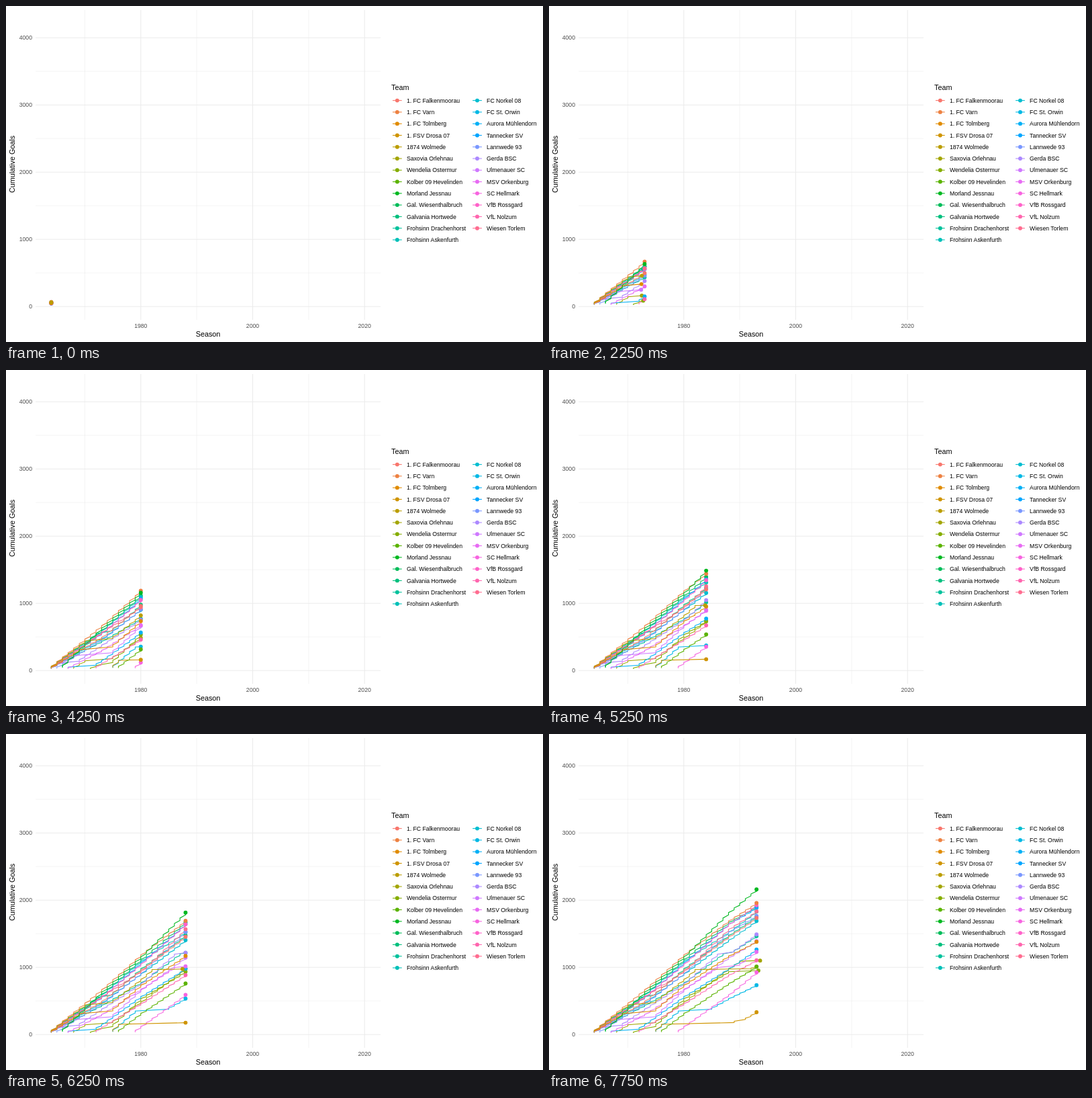
Animation, 800 px wide and 500 px high, one loop 8 s. Source, as an HTML page:

```html
<!DOCTYPE html>
<html lang="de">
<head>
<meta charset="utf-8">
<style>
  html, body { margin: 0; width: 100%; height: 100%; overflow: hidden; background: #fff; }
  svg { display: block; font: 8.7px "Liberation Sans", Arial, sans-serif; }
  .title { font-size: 10.8px; }
  .tick { fill: #4d4d4d; }
  .end { text-anchor: end; }
  .middle { text-anchor: middle; }
  .grid { stroke: #ebebeb; }
  polyline { fill: none; stroke-width: 1.07; }
</style>
</head>
<body>
<svg width="800" height="500" viewBox="0 0 800 500"></svg>
<script>
// Each team: name, totals at the knot years, first season, then pairs of first and last missed season.
const TEAMS = [
  ['1. FC Falkenmoorau', [497, 960, 1455, 1735]],
  ['1. FC Varn', [668, 1187, 1692, 1957]],
  ['1. FC Tolmberg', [310, 735, 1170, 1380], 64, 70, 74],
  ['1. FSV Drosa 07', [152, 152, 332], 75, 77, 88, 90, 90],
  ['1874 Wolmede', [440, 820, 967, 1010], 64, 71, 74, 83, 91],
  ['Saxovia Orlehnau', [145, 485, 980, 1091], 68, 71, 74, 91, 99],
  ['Wendelia Ostermur', [75, 535, 935, 935], 71, 73, 74, 89, 95],
  ['Kolber 09 Hevelinden', [315, 760, 1010], 76],
  ['Morland Jessnau', [632, 1157, 1815, 2160], 66],
  ['Gal. Wiesenthalbruch', [600, 1115, 1670, 1900], 66],
  ['Galvania Hortwede', [550, 980, 1475, 1755], 64, 73, 74],
  ['Frohsinn Drachenhorst', [435, 770, 1200, 1465], 64, 88, 88],
  ['Frohsinn Askenfurth', [590, 1095, 1525, 1830]],
  ['FC Norkel 08', [475, 905, 1405, 1690]],
  ['FC St. Orwin', [350, 535, 735], 75, 80, 84],
  ['Aurora Mühlendorn', [150, 565, 980, 1265], 67, 68, 71],
  ['Tannecker SV', [555, 1070, 1645, 1885]],
  ['Lannwede 93', [460, 910, 1525, 1765], 65],
  ['Gerda BSC', [380, 755, 1195, 1490], 64, 66, 68, 87, 88],
  ['Ulmenauer SC', [222, 665, 1145, 1390], 64, 69, 74],
  ['MSV Orkenburg', [300, 675, 997, 1230], 67, 87, 89],
  ['SC Hellmark', [120, 591, 925], 79],
  ['VfB Rossgard', [560, 1050, 1640, 1925]],
  ['VfL Nolzum', [109, 460, 885, 1105], 72],
  ['Wiesen Torlem', [570, 940, 1567, 1833]],
];
const KNOTS = [63, 73, 80, 88, 93, 100];
const FRAME_MS = 250, FRAMES = 32, FRAMES_PER_YEAR = 59 / 56;
const DRAWN_LAST = [0, 1, 2, 3, 4, 7, 8];

const svg = document.querySelector('svg');
const px = year => 200.8 + (year - 80) * 8.335;
const py = goals => 447.2 - goals * 0.1;
const frameOf = year => Math.round((year - 64) * FRAMES_PER_YEAR);

function add(tag, attrs, text = '') {
  const el = document.createElementNS('http://www.w3.org/2000/svg', tag);
  for (const key in attrs) el.setAttribute(key, attrs[key]);
  el.textContent = text;
  return svg.appendChild(el);
}
const label = (x, y, text, cls = '') => add('text', { x, y, class: cls }, text);

// Evenly spaced hues in polar LUV space, lightness 65 and chroma 100
function hueColor(i) {
  const h = (15 + i * 360 / TEAMS.length) * Math.PI / 180, L = 65, C = 100;
  const u = C * Math.cos(h) / (13 * L) + 0.1978, v = C * Math.sin(h) / (13 * L) + 0.4683;
  const Y = ((L + 16) / 116) ** 3, X = 9 * Y * u / (4 * v), Z = 3 * Y / v - 5 * Y - X / 3;
  const gamma = c => c <= 0.00304 ? 12.92 * c : 1.055 * c ** (1 / 2.4) - 0.055;
  const rgb = [
    3.2405 * X - 1.5372 * Y - 0.4985 * Z,
    -0.9693 * X + 1.876 * Y + 0.0416 * Z,
    0.0556 * X - 0.204 * Y + 1.0573 * Z,
  ].map(c => Math.round(255 * Math.min(1, Math.max(0, gamma(c)))));
  return `rgb(${rgb})`;
}

// Two rows per season: after the home games and after the away games
function seasonRows([, totals, start = 64, ...gaps]) {
  const plays = y => y >= start && !gaps.some((g, i) => i % 2 === 0 && y >= g && y <= gaps[i + 1]);
  const knotValues = [0, ...(totals.length < 4 ? [0] : []), ...totals];
  const rows = [];
  let total = 0;
  for (let k = 1; k < KNOTS.length; k++) {
    const years = [];
    for (let y = KNOTS[k - 1] + 1; y <= KNOTS[k]; y++) if (plays(y)) years.push(y);
    const goals = k < 5 ? (knotValues[k] - knotValues[k - 1]) / years.length : 45;
    for (const y of years) {
      rows.push([y, total + goals * 0.58], [y, total + goals]);
      total += goals;
    }
  }
  return rows;
}

// Rows reached by this frame, plus a straight step towards the next one
function reveal(rows, frame) {
  const shown = rows.filter(r => frameOf(r[0]) <= frame);
  if (shown.length) {
    const [year, goals] = shown[shown.length - 1];
    const [nextYear, nextGoals] = rows[shown.length];
    const f = (frame - frameOf(year)) / (frameOf(nextYear) - frameOf(year));
    shown.push([year + (nextYear - year) * f, goals + (nextGoals - goals) * f]);
  }
  return shown.map(([y, goals]) => [px(y), py(goals)]);
}

function gridLine(x1, y1, x2, y2, major) {
  add('line', { x1, y1, x2, y2, class: 'grid', 'stroke-width': major ? 1.07 : 0.53 });
}
for (let goals = 0; goals <= 4000; goals += 500) {
  const major = goals % 1000 === 0;
  gridLine(44, py(goals), 558, py(goals), major);
  if (major) label(39, py(goals) + 3.1, goals, 'tick end');
}
for (let year = 70; year <= 120; year += 10) {
  const major = year % 20 === 0;
  gridLine(px(year), 6, px(year), 467, major);
  if (major) label(px(year), 479, 1900 + year, 'tick middle');
}
label(301, 492, 'Season', 'title middle');
label(0, 0, 'Cumulative Goals', 'title middle').setAttribute('transform', 'translate(13 235.5) rotate(-90)');
label(574, 125, 'Team', 'title');

const series = TEAMS.map((team, i) => {
  const color = hueColor(i), second = i > 12;
  const x = second ? 702 : 582.8, y = 140.6 + 17.28 * (second ? i - 13 : i);
  add('line', { x1: x - 6.9, x2: x + 6.9, y1: y, y2: y, stroke: color, 'stroke-width': 1.07 });
  add('circle', { cx: x, cy: y, r: 2.95, fill: color });
  label(x + 14.1, y + 3.2, team[0]);
  return { rows: seasonRows(team), color, rank: DRAWN_LAST.includes(i) ? 100 + i : i };
}).sort((a, b) => a.rank - b.rank);

for (const s of series) s.line = add('polyline', { stroke: s.color });
for (const s of series) s.dot = add('circle', { r: 2.95, fill: s.color });

function draw() {
  const frame = Math.floor(performance.now() / FRAME_MS) % FRAMES;
  for (const { rows, line, dot } of series) {
    const points = reveal(rows, frame);
    const tip = points[points.length - 1] || [-10, -10];
    line.setAttribute('points', points.join(' '));
    dot.setAttribute('cx', tip[0]);
    dot.setAttribute('cy', tip[1]);
  }
  requestAnimationFrame(draw);
}
draw();
</script>
</body>
</html>
```
